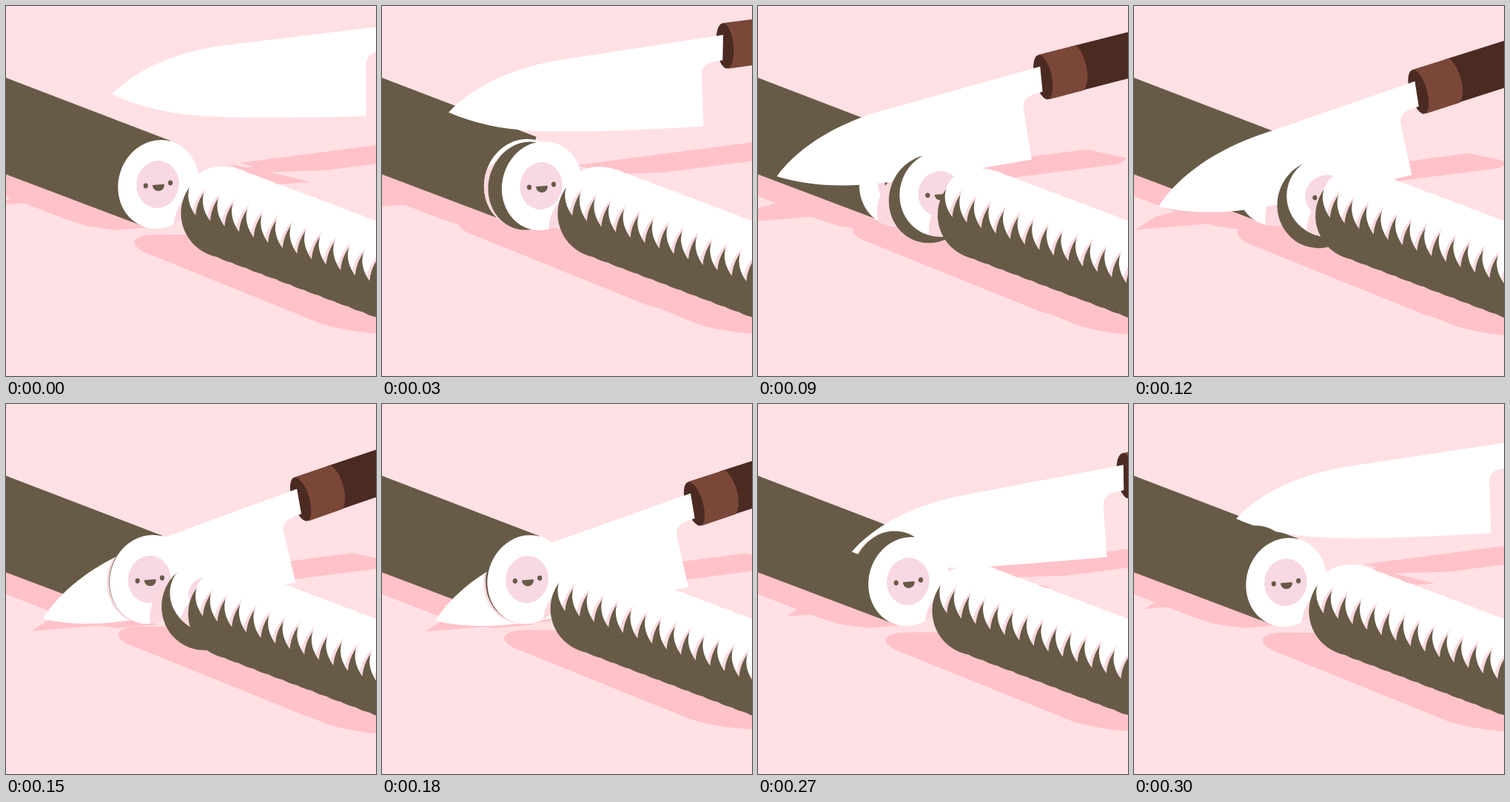
Animation of 500 by 500 pixels, one loop 0.33 s. Source, as an HTML page with a canvas:

```html
<!DOCTYPE html>
<html>
<head>
<meta charset="utf-8">
<title>Slicing a roll</title>
<style>
html, body { margin: 0; width: 100%; height: 100%; overflow: hidden; background: #ffe0e4; }
canvas { display: block; width: 500px; height: 500px; }
</style>
</head>
<body>
<canvas id="stage" width="500" height="500"></canvas>
<script>
const ctx = document.getElementById('stage').getContext('2d');
const BG = '#ffe0e4', SHADOW = '#ffc2c9', NORI = '#675b47', RICE = '#fff',
      FISH = '#f8d8e3', SHADE = '#fbd9df', WOOD = '#7a4738', DARK_WOOD = '#4b2a22';
const STEP = 30, STEPS = 11;

// Key poses of the knife, evenly spaced: tip x, tip y, angle in degrees
const KEYS = [[143,119,5], [36,184,.2], [33,271,-7.1], [72,293,-7.6], [111,246,-1.5], [138,155,3.3]];

const BLADE = new Path2D('M36 184C62 153 108 123 177 107L399 61L400 95L391 97' +
  'C378 99 372 106 373 117L379 185C300 193 215 203 150 203C105 203 68 196 36 184Z');
const GRIP = new Path2D('M442 37L570 14L582 73L452 97Z');
const COLLAR = new Path2D('M398 45L448 36C460 44 468 84 455 97L408 106Z');
const ROW_SHADOW = new Path2D('M215 309C162 307 168 325 190 334L425 429' +
  'Q465 442 530 444L560 420L260 309Z');

const smooth = s => s * s * (3 - 2 * s);

function fill(path, color) {
  ctx.fillStyle = color;
  ctx.fill(path);
}

function poly(color, pts, x = 0, y = 0) {
  const p = new Path2D();
  for (const [px, py] of pts) p.lineTo(x + px, y + py);
  fill(p, color);
}

function oval(x, y, rx, ry, rot = 0) {
  const p = new Path2D();
  p.ellipse(x, y, rx, ry, rot, 0, 7);
  return p;
}

// A slice is a face with the rim showing behind it
const slice = (x, y, rx, ry, rot, ox, oy, rimX = rx, rimY = ry) => ({
  x, y, rx, ry,
  face: oval(x, y, rx + .6, ry + .6, rot),
  rim: (dx = 0, dy = 0) => oval(x + ox + dx, y + oy + dy, rimX, rimY, rot)
});

function shadeOn(face, shape) {
  ctx.save();
  ctx.clip(face);
  fill(shape, SHADE);
  ctx.restore();
}

function drawSlice(s) {
  fill(s.rim(), NORI);
  fill(s.face, RICE);
}

function drawSmile({ x, y, rx, ry }) {
  const kx = rx / 53, ky = ry / 60;
  fill(oval(x - 1, y, 28.5 * kx, 32 * ky, .15), FISH);
  fill(oval(x - 17 * kx, y + 2 * ky, 3.1, 3.4), NORI);
  fill(oval(x + 16 * kx, y - 2 * ky, 3.1, 3.4), NORI);
  const mouth = new Path2D();
  mouth.ellipse(x, y + 1.5, 7.8 * kx, 7.5 * ky, -.08, -.15, Math.PI + .15);
  mouth.closePath();
  fill(mouth, NORI);
}

// Smooth curve through the key poses
function knifeAt(i) {
  const n = KEYS.length, k = Math.floor(i / 2), f = i / 2 - k;
  const [a, b, c, d] = [-1, 0, 1, 2].map(o => KEYS[(k + o + n) % n]);
  return b.map((v, j) => v + f / 2 * (c[j] - a[j] +
    f * (2 * a[j] - 5 * v + 4 * c[j] - d[j] + f * (3 * (v - c[j]) + d[j] - a[j]))));
}

function drawKnife([x, y, angle], cover) {
  ctx.save();
  ctx.translate(x, y);
  ctx.rotate((angle - .2) * Math.PI / 180);
  ctx.scale(1.006, 1.006);
  ctx.translate(-36, -184);
  fill(GRIP, DARK_WOOD);
  fill(COLLAR, WOOD);
  fill(oval(402, 75.5, 11.5, 30.5, -.15), DARK_WOOD);
  fill(BLADE, RICE);
  if (cover) {
    ctx.clip(BLADE);
    ctx.setTransform(1, 0, 0, 1, 0, 0);
    fill(cover, SHADE);
  }
  ctx.restore();
}

function drawRowShadow(d) {
  ctx.save();
  ctx.translate(d, d * .37);
  fill(ROW_SHADOW, SHADOW);
  ctx.restore();
}

// The higher the tip, the further its shadow falls to the left
function drawKnifeShadow([x, y]) {
  const hx = x + 419, hy = 165 + y / 8, up = 300 - y;
  poly(SHADOW, [[0,0], [55,12], [42,20], [-130,42], [-225,45], [-240,40],
                [-228,37], [-246,32], [-215,28]], hx, hy);
  poly(SHADOW, [[-260,34], [-225,40], [-150,58], [-205,62]], hx, hy);
  poly(SHADOW, [[0,0], [28,-18], [90,-34], [170,-50], [170,-14]], x - 8 - .8 * up, 309 - .22 * up);
}

function draw(i) {
  const u = i / (STEPS - 1), cutting = i > 0 && u <= .5, behind = u >= .5;
  const knife = knifeAt(i);

  // The row moves on by one slice per loop, in two eased pushes
  const push = Math.floor(2 * u), shift = (push + smooth(2 * u - push)) / 2;
  const rowAt = k => slice(302.4 + 19.6 * (k + shift), 263.1 + 7.4 * (k + shift),
                           57, 44, .361, -6, 17, 60, 60);
  const start = u > .5 ? -1 : 0, first = rowAt(start);

  // The cut slice tips over until it leans on the row
  const p = 2.5 * (u - .1) * .8;
  const fall = slice(216 + 77 * p, 243 + 17 * p * (2 - p), 53 + 4 * p, 60 - 16 * p * p,
                     .28 + .08 * p, 13 * p - 19, 17 * p, 53 + 7 * p, 60);

  // The roll recoils; its new end closes over the leaving blade
  const ex = 206 - 15 * Math.sin(Math.PI * u ** .45), ey = 241 - 4 * Math.sin(Math.PI * u);
  const depth = behind ? 3 * 2 ** (i - 6) : 0;
  const end = slice(ex, ey, 53.5, 60, .3, -.935 * depth, -.36 * depth);

  ctx.fillStyle = BG;
  ctx.fillRect(0, 0, 500, 500);
  drawKnifeShadow(knife);
  poly(SHADOW, [[0,225], [0,257], [75,286], [108,297], [150,303], [205,298], [150,270]]);
  drawRowShadow(21 * (start + shift) * .935);
  if (cutting) drawRowShadow(60 * p - 70);

  const tx = ex + 16, bx = ex - 18;
  poly(NORI, [[0,97], [tx, 97 + .383 * tx], [bx, 227.5 + .378 * bx], [0,227.5]]);

  const drawEnd = () => {
    drawSlice(end);
    drawSmile(end);
    shadeOn(end.face, cutting ? fall.rim(-16, 16) : first.rim(-10, 20));
  };
  if (!behind) drawEnd();
  drawKnife(knife, behind && end.rim(-3, 1));
  if (behind) drawEnd();

  if (cutting) {
    drawSlice(fall);
    drawSmile(fall);
    shadeOn(fall.face, first.rim(-12, 22));
  }

  // Leaning slices, each over the one to its left
  for (let k = start; k < 15; k++) {
    const s = rowAt(k);
    drawSlice(s);
    shadeOn(s.face, rowAt(k + 1).rim(-5.2, 2.3));
  }
}

const begin = performance.now();
let shown = -1;
function tick() {
  const i = Math.floor((performance.now() - begin) / STEP) % STEPS;
  if (i !== shown) draw(shown = i);
  requestAnimationFrame(tick);
}
tick();
</script>
</body>
</html>
```
